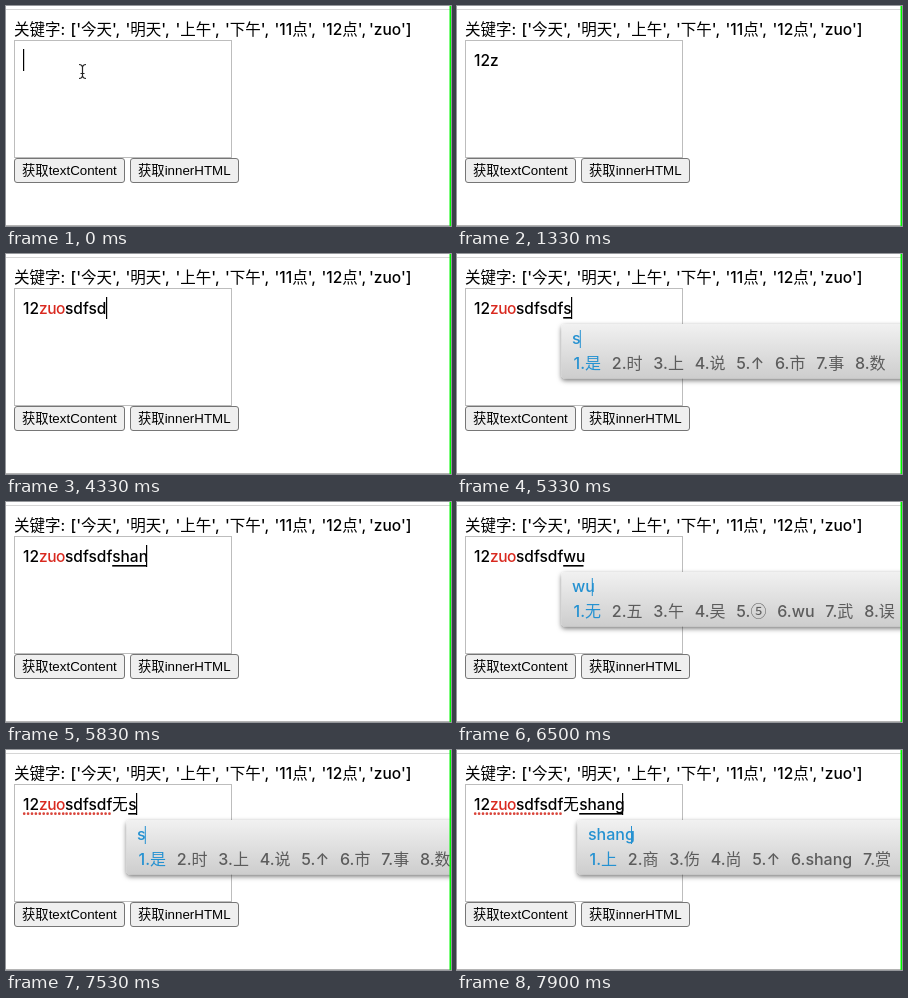
An HTML page for the animation above (8 s loop, 445 px wide and 220 px high).

```html
<!DOCTYPE html>
<html lang="zh-CN">
<head>
<meta charset="utf-8">
<title>Keyword highlight</title>
<style>
html, body { margin: 0; width: 100%; height: 100%; overflow: hidden; background: #fff; }
svg { display: block; width: 445px; height: 220px; }
text { font: 450 15.5px Inter, "Noto Sans CJK SC", "Noto Sans CJK", sans-serif; white-space: pre; }
.button { font: 500 13.33px "Liberation Sans", "Noto Sans CJK SC", "Noto Sans CJK", sans-serif; }
.han { font-family: "Noto Sans CJK SC", "Noto Sans CJK", sans-serif; }
#key { letter-spacing: -.45px; }
#popup text { fill: #5c5c5c; font-size: 16px; }
#popup .active { fill: #2491d1; }
</style>
</head>
<body>
<svg viewBox="0 0 445 220">
  <defs>
    <linearGradient id="panel" x2="0" y2="1">
      <stop stop-color="#f1f1f1"/>
      <stop offset="1" stop-color="#cdcdcd"/>
    </linearGradient>
    <filter id="shadow" x="-10%" y="-30%" width="120%" height="170%">
      <feDropShadow dx="0" dy="2" stdDeviation="2.6" flood-opacity=".55"/>
    </filter>
  </defs>
  <path d="M0 3.5H445" stroke="#d6d6d6"/>
  <path d="M0 219.5H445" stroke="#b4b4b4"/>
  <g id="title"></g>
  <rect x="8.5" y="34.5" width="217" height="117" fill="#fff" stroke="#bdbdbd"/>
  <g fill="#efefef" stroke="#767676">
    <rect x="8.5" y="152.5" width="110" height="24" rx="2.5"/>
    <rect x="124.5" y="152.5" width="108" height="24" rx="2.5"/>
  </g>
  <text class="button" x="16" y="169">获取textContent</text>
  <text class="button" x="132" y="169">获取innerHTML</text>

  <text id="num" y="60"></text>
  <text id="key" y="60"></text>
  <text id="rest" y="60"></text>
  <text id="word" y="60"></text>
  <text id="comp" y="60"></text>
  <path id="spell" d="M18.2 63.7H57.5M60.6 63.7H105" stroke="#d9443a" stroke-width="2.7" stroke-linecap="round" stroke-dasharray="0 3.9"/>
  <rect id="under" y="63" height="1.6"/>
  <rect id="caret" y="43" width="1.2" height="22"/>
  <path id="mouse" d="M73 58.5Q76 58.5 76.5 61Q77 58.5 80 58.5M76.5 61V70M73 72.5Q76 72.5 76.5 70Q77 72.5 80 72.5M74.5 67.5H78.5" fill="none" stroke="#222" stroke-width="1.2"/>

  <g id="popup">
    <rect x="104.5" y="70" width="380" height="54.5" rx="3.5" fill="url(#panel)" filter="url(#shadow)"/>
    <text id="pinyin" class="active" x="115" y="90"></text>
    <rect id="mark" class="active" y="76" width="1" height="18"/>
    <g id="choices"></g>
  </g>
  <rect x="443.5" width="1.5" height="220" fill="#00f900"/>
</svg>
<script>
const LOOP = 8000, LEFT = 17, RED = '#d9291f';
const $ = id => document.getElementById(id);
const set = (el, attrs) => { for (const k in attrs) el.setAttribute(k, attrs[k]); };
const show = (id, on) => set($(id), { visibility: on ? 'visible' : 'hidden' });

const ADVANCE = { 1: 7.5, 2: 8.5, z: 8, u: 9, o: 9, s: 8.3, d: 9.7, f: 5.6, h: 9, a: 8.4, n: 8.8, g: 9, w: 11.3, '无': 16 };
const width = str => [...str].reduce((sum, c) => sum + ADVANCE[c], 0);

const CHOICES = {
  s: '是 时 上 说 ↑ 市 事 数',
  sh: '是 时 上 说 ↑ 市 事 数',
  sha: '啥 杀 沙 傻 厦 sha 纱 砂',
  shan: '山 闪 善 删 扇 shan 衫 珊',
  shang: '上 商 伤 尚 ↑ shang 赏 裳',
  w: '我 为 无 问 ↑ 王 位 万',
  wu: '无 五 午 吴 ⑤ wu 武 误'
};

const BASE = '12zuosdfsdf', DONE = BASE + '无';
// time, text, flags: c caret, k red keyword, r red tail, m mouse, p popup, w/W spelling marks; composition
const STEPS = [
  [0, '', 'cm'], [30, '', 'c'], [70, '1', 'c'], [270, '12', 'c'], [770, '12z', 'c'],
  [1330, '12z', ''], [1400, '12zu', 'c'], [1470, '12zuo', 'c'],
  [2200, '12zuo', 'kcr'], [2230, '12zuo', 'kr'], [2700, '12zuo', 'kcr'], [3200, '12zuo', 'kr'],
  [3270, '12zuos', 'kcr'], [3370, '12zuosd', 'kcr'], [3470, '12zuosdf', 'kcr'],
  [4000, '12zuosdfs', 'kcr'], [4200, '12zuosdfs', 'kc'], [4270, '12zuosdfsd', 'kc'], [4370, BASE, 'kc'],
  [4930, BASE, 'k'], [4970, BASE, 'kc'],
  [5300, BASE, 'kc', 's'], [5330, BASE, 'kcp', 's'], [5400, BASE, 'kcp', 'sh'],
  [5500, BASE, 'kcp', 'sha'], [5600, BASE, 'kcp', 'shan'], [5830, BASE, 'kc', 'shan'],
  [5900, BASE, 'kc'], [6000, BASE, 'kc', 'w'], [6030, BASE, 'kcp', 'w'], [6130, BASE, 'kcp', 'wu'],
  [6500, BASE, 'kp', 'wu'], [6800, DONE, 'kc'], [7170, DONE, 'kcw'], [7230, DONE, 'kcW'],
  [7430, DONE, 'kcW', 's'], [7470, DONE, 'kcWp', 's'], [7570, DONE, 'kcWp', 'sh'],
  [7670, DONE, 'kcWp', 'sha'], [7770, DONE, 'kcWp', 'shan'], [7870, DONE, 'kcWp', 'shang']
];

function make(tag, parent, str, attrs = {}) {
  const el = document.createElementNS('http://www.w3.org/2000/svg', tag);
  set(el, attrs);
  el.textContent = str;
  parent.append(el);
  return el;
}

const TITLE = { 8: '关键字:', 64.5: "['今天',", 119.5: "'明天',", 169.5: "'上午',", 219: "'下午',", 268.5: "'11点',", 315.5: "'12点',", 363: "'zuo']" };
for (const x in TITLE) make('text', $('title'), TITLE[x], { x, y: 29 });

function drawPopup(comp, shift) {
  set($('popup'), { transform: `translate(${shift} 0)` });
  $('pinyin').textContent = comp;
  set($('mark'), { x: 114.5 + width(comp) });
  $('choices').replaceChildren();
  let x = 116.5;
  CHOICES[comp].split(' ').forEach((word, i) => {
    const el = make('text', $('choices'), `${i + 1}.`, { x, y: 115, class: i ? '' : 'active' });
    make('tspan', el, word, { class: /[a-z↑]/.test(word) ? '' : 'han' });
    x += el.getComputedTextLength() + 10.8;
  });
}

function draw([, text, flags, comp = '']) {
  const has = f => flags.includes(f);
  const put = (id, from, to, fill) => {
    $(id).textContent = text.slice(from, to);
    set($(id), { x: LEFT + width(text.slice(0, from)), fill });
  };
  put('num', 0, 2, '#000');
  put('key', 2, 5, has('k') ? RED : '#000');
  put('rest', 5, 11, has('r') ? RED : '#000');
  put('word', 11, 12, '#000');

  const start = LEFT + width(text), end = start + width(comp);
  $('comp').textContent = comp;
  set($('comp'), { x: start });
  set($('under'), { x: start, width: end - start });
  set($('caret'), { x: Math.floor(end), fill: has('r') ? RED : '#000' });
  set($('spell'), { opacity: has('W') ? 1 : .5 });
  show('caret', has('c'));
  show('mouse', has('m'));
  show('spell', /w/i.test(flags));
  show('popup', has('p'));
  if (has('p')) drawPopup(comp, start - LEFT - width(BASE));
}

const began = performance.now();
let current;
function tick() {
  const t = Math.max(0, performance.now() - began) % LOOP;
  const step = STEPS.findLast(s => s[0] <= t);
  if (step !== current) draw(current = step);
  requestAnimationFrame(tick);
}
tick();
</script>
</body>
</html>
```
